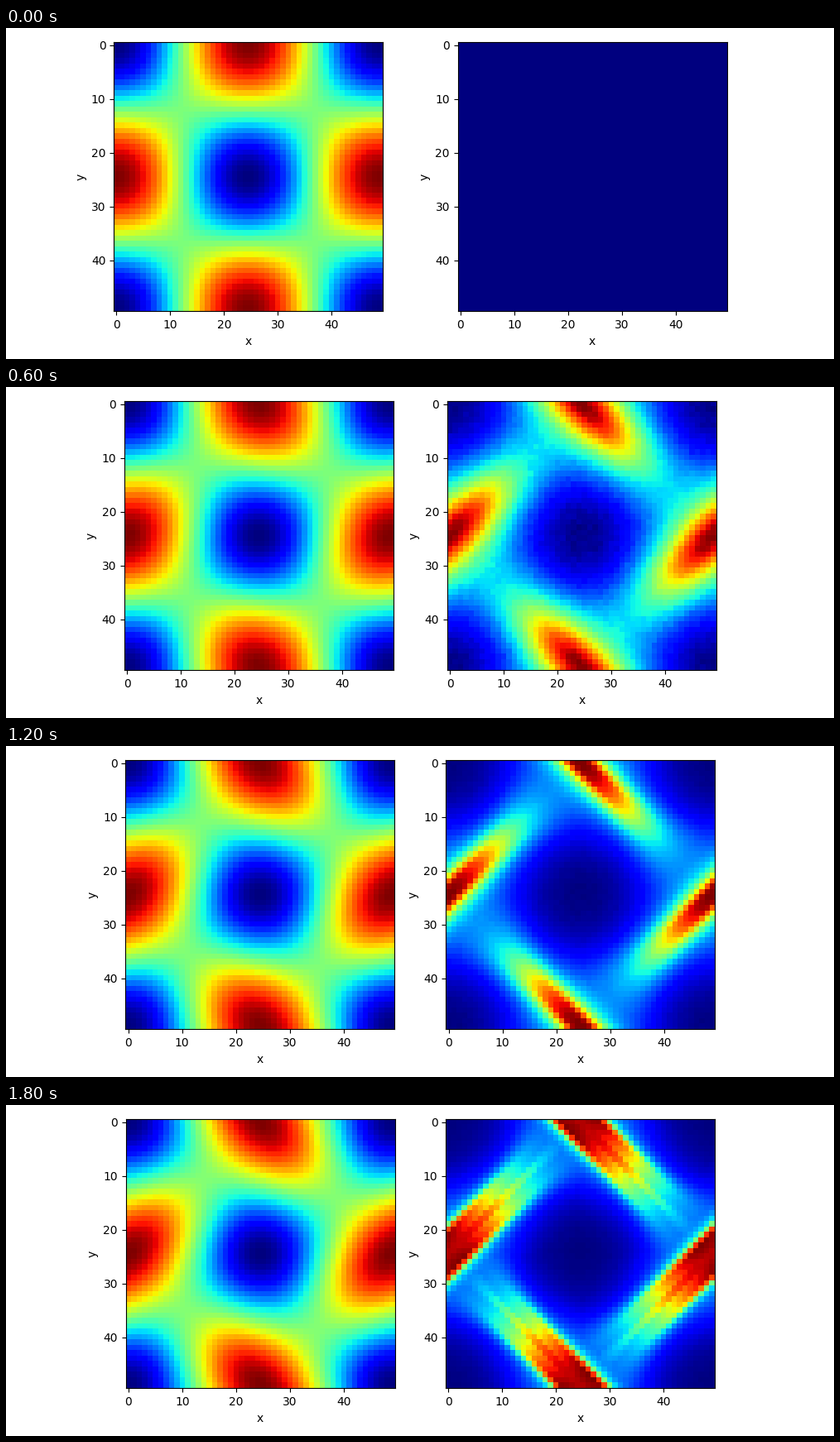
A matplotlib script that plays this animation: 1000 px wide and 400 px high, repeating every 2 s.

```python
import numpy as np
import matplotlib.pyplot as plt
from matplotlib.animation import FuncAnimation

WIDTH, HEIGHT = 1000, 400
FRAMES, INTERVAL = 10, 200
CELLS = 50
SIDE, BOTTOM = 325.0, 57.6

plt.rcParams["font.family"] = "DejaVu Sans"
plt.rcParams["font.size"] = 10

grid = np.linspace(0, 2 * np.pi, CELLS)
X, Y = np.meshgrid(grid, grid)
cell = grid[1]
speckle = np.random.default_rng(7).normal(size=X.shape)


def velocity(x, y):
    return -np.sin(y), np.sin(x)


def strain(x, y):
    """Strain minus rotation of the cellular flow."""
    return -np.cos(x) * np.cos(y)


def path_mean(x, y, duration, steps=24):
    """Mean of strain along the paths that start at (x, y)."""
    if duration == 0:
        return strain(x, y)
    h = duration / steps
    total = np.zeros_like(x)
    for _ in range(steps):
        u, v = velocity(x, y)
        um, vm = velocity(x + h / 2 * u, y + h / 2 * v)
        total += strain(x + h / 2 * u, y + h / 2 * v)
        x, y = x + h * um, y + h * vm
    return total / steps


def growth(x, y, duration):
    return np.exp(0.8 * duration * path_mean(x, y, duration))


def widened(duration, reach):
    """Growth, with its ridges broadened across the diagonals."""
    if reach == 0:
        return growth(X, Y, duration)
    shifts = np.linspace(-reach / 2, reach / 2, 9) * cell
    return np.max([growth(X + s, Y + side * s, duration)
                   for s in shifts for side in (-1, 1)], axis=0)


def left_field(i):
    return path_mean(X, Y, 0.05 * i)


def right_field(i):
    if i == 0:
        return np.zeros_like(X)
    late = max(i - 5, 0)
    field = widened(0.35 * min(i, 5) + 0.26 * late, 0.95 * late)
    field = (field - field.min()) / np.ptp(field)
    return field + 0.045 / i ** 1.7 * speckle


def add_panel():
    ax = fig.add_axes([0.1, BOTTOM / HEIGHT, SIDE / WIDTH, SIDE / HEIGHT])
    image = ax.imshow(np.zeros_like(X), cmap="jet", aspect="auto")
    ax.set(xlabel="x", ylabel="y",
           xticks=range(0, CELLS, 10), yticks=range(0, CELLS, 10))
    return ax, image


def place(ax, left):
    ax.set_position([left / WIDTH, BOTTOM / HEIGHT,
                     SIDE / WIDTH, SIDE / HEIGHT])


fig = plt.figure(figsize=(WIDTH / 100, HEIGHT / 100), dpi=100,
                 facecolor="white")
left_ax, left_image = add_panel()
right_ax, right_image = add_panel()
fields = [(left_field(i), right_field(i)) for i in range(FRAMES)]


def update(i):
    # The panels close in on each other, halving the rest each time.
    gap = 0.5 ** i
    place(left_ax, 144.7 - 14.5 * gap)
    place(right_ax, 531.1 + 14.6 * gap)
    for image, field in zip((left_image, right_image), fields[i]):
        image.set_data(field)
        low, high = field.min(), field.max()
        image.set_clim(low, high if high > low else low + 1)
    return left_image, right_image


animation = FuncAnimation(fig, update, frames=FRAMES, interval=INTERVAL,
                          repeat=True, repeat_delay=0, blit=False)
plt.show()
```
